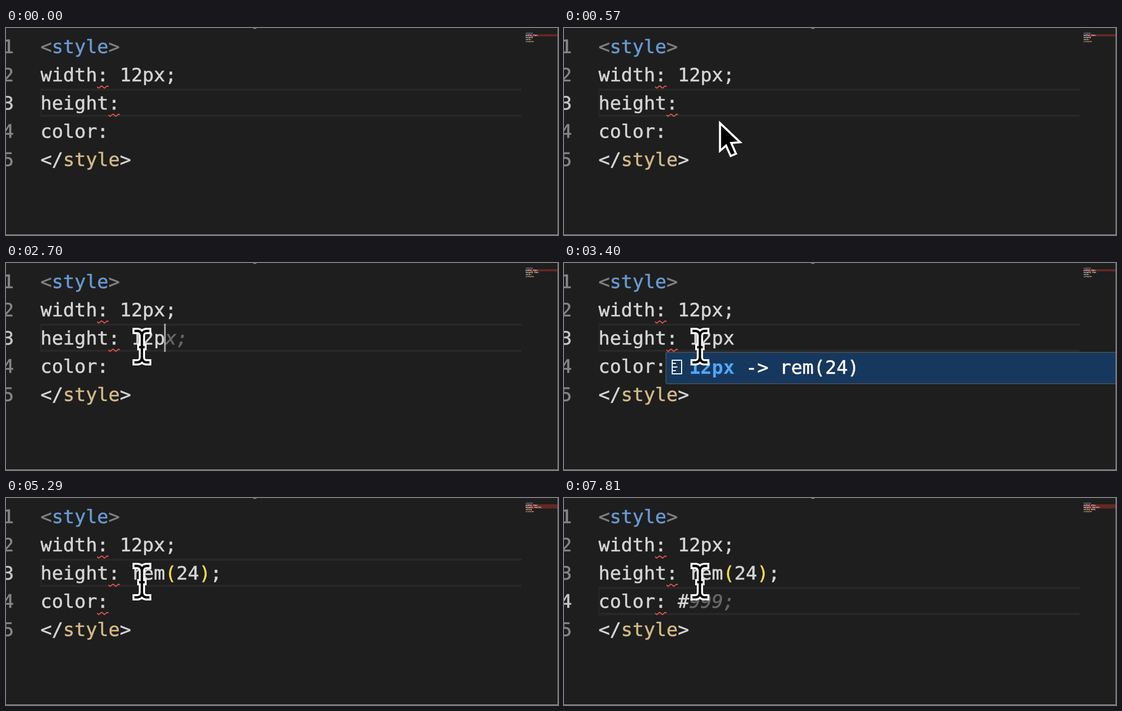
Animation of 1056 by 396 pixels, one loop 8 s. Source, as an HTML page:

```html
<!DOCTYPE html>
<html lang="en">
<head>
<meta charset="utf-8">
<title>Editor</title>
<style>
html, body { margin: 0; width: 100%; height: 100%; overflow: hidden; background: #1e1e1e; }
svg { display: block; }
text {
  font-family: "DejaVu Sans Mono", monospace; font-size: 36px; white-space: pre;
  fill: currentColor; stroke: currentColor; stroke-width: .6; color: #d4d4d4;
}
.tag { color: #808080; }
.blue { color: #679ad1; }
.gold { color: #d2ba85; }
.paren { color: #fad847; }
.num { color: #858585; }
.num.active { color: #c6c6c6; }
.ghost { color: #676767; font-style: italic; }
.match { color: #4fa8fa; font-weight: bold; stroke: none; }
.item { color: #fff; }
.map text { font-size: 3.32px; stroke-width: .2; }
.wave { fill: none; stroke: #e0524a; stroke-width: 2; stroke-linejoin: round; }
.box { fill: rgba(0,100,0,.05); stroke: #868686; stroke-width: 2; }
.arrow { fill: #000; stroke: #fff; stroke-width: 4; }
.beam { fill: none; stroke-linecap: square; }
</style>
</head>
<body>
<svg width="1056" height="396" viewBox="0 0 1056 396">
  <defs>
    <path id="stem" d="M248 130H252Q260 131 260 140V180Q260 189 252 190H248M272 130H268Q260 131 260 140M260 180Q260 189 268 190H272M257 161H263"/>
  </defs>
  <rect width="1056" height="396" fill="#1e1e1e"/>
  <g id="view"></g>
  <g id="arrow"><path class="arrow" d="M1.5 4V57L13 47L22 67L32 62.5L23 42L40 40.5Z"/></g>
  <g id="beam" class="beam">
    <use href="#stem" stroke="#fff" stroke-width="12"/>
    <use href="#stem" stroke="#000" stroke-width="4.6"/>
  </g>
  <path d="M473 0H480L478 1.5H473Z" fill="#8a8a8a"/>
  <path d="M0 395.5H1056" stroke="#a8a8a8"/>
  <path d="M1055.5 0V396" stroke="#808080"/>
</svg>
<script>
const LOOP = 8000, LEFT = 66, TOP = 8, CELL = 21.674, LINE = 54;
const $ = id => document.getElementById(id);
const colX = col => LEFT + col * CELL;
const rowY = row => TOP + (row - 1) * LINE;
// The screen is shown at double size, so hard edges sit on even pixels.
const snapX = col => Math.round(colX(col) / 2) * 2;

// Each step changes part of the editor state; caret 0 means hidden.
const START = { row: 3, height: '', color: '', ghost: '', caret: 0, match: 0, boxes: false, error: false };
const STEPS = [
  [900, { caret: 8 }],
  [1330, { caret: 0 }],
  [1720, { height: ' 1', caret: 9 }],
  [1800, { height: ' 12', caret: 10 }],
  [1980, { ghost: 'px;' }],
  [2280, { caret: 0 }],
  [2700, { height: ' 12p', ghost: 'x;', caret: 11 }],
  [2810, { ghost: '', match: 3 }],
  [2960, { height: ' 12px', caret: 12, match: 4 }],
  [3400, { caret: 0 }],
  [3730, { height: ' rem(24)', caret: 15, match: 0 }],
  [3830, { boxes: true }],
  [4250, { caret: 0 }],
  [4770, { caret: 15 }],
  [4840, { height: ' rem(24);', caret: 16 }],
  [4910, { boxes: false }],
  [4980, { error: true }],
  [5290, { caret: 0 }],
  [5410, { row: 4, caret: 7 }],
  [5920, { caret: 0 }],
  [6390, { caret: 7 }],
  [6910, { caret: 0 }],
  [6990, { color: ' #', caret: 8 }],
  [7510, { caret: 0 }],
  [7810, { ghost: '999;' }]
];

// Pointer tip: time, x, y
const PATH = [
  [260, 162, 336], [304, 257, 265], [348, 312, 232], [393, 318, 212],
  [480, 312, 192], [569, 297, 178], [660, 280, 168], [790, 260, 160]
];
const SHOW = 260, BEAM = 835, TICK = 44.2;

const esc = s => s.replace(/&/g, '&amp;').replace(/</g, '&lt;').replace(/>/g, '&gt;');
const label = (x, y, s, cls = '') => `<text x="${x}" y="${y}" class="${cls}">${esc(s)}</text>`;
const rect = (x, y, w, h, fill) => `<rect x="${x}" y="${y}" width="${w}" height="${h}" fill="${fill}"/>`;
const code = (col, row, s, cls) => label(colX(col), rowY(row) + 39.5, s, cls);

// Draws a run of [text, class] pieces on one line.
function line(row, parts) {
  let col = 0;
  return parts.map(([s, cls]) => {
    const out = code(col, row, s, cls);
    col += s.length;
    return out;
  }).join('');
}

function wave(col, row) {
  const period = 'l2.6 2.5h1l4.4 -3.9h1l1.84 1.4';
  return `<path class="wave" d="M${colX(col)} ${rowY(row) + LINE - 3.7}${period}${period}"/>`;
}

function bracketBox(col) {
  const x = snapX(col), w = snapX(col + 1) - x;
  return `<rect class="box" x="${x + 1}" y="${rowY(3) + 1}" width="${w - 2}" height="${LINE - 2}"/>`;
}

function currentLine(row) {
  const y = rowY(row), c = '#282828';
  return rect(LEFT, y, 920, 4, c) + rect(LEFT, y + LINE - 4, 920, 4, c) + rect(LEFT, y, 2, LINE, c);
}

function popup(match) {
  const x = colX(8), word = '12px', rest = ' -> rem(24)';
  return '<rect x="195" y="171" width="900" height="60" rx="3" fill="#17385e" stroke="#454a50" stroke-width="2"/>' +
    '<path d="M207 186H225V212H207ZM208 192H214M208 199H217M208 206H214" fill="none" stroke="#fff" stroke-width="2"/>' +
    label(x, 212, word.slice(0, match), 'match') +
    label(x + match * CELL, 212, word.slice(match) + rest, 'item');
}

function minimap(lines, errors, bars) {
  const x = 994;
  return '<g class="map">' + rect(x, 12, 61, bars * 4, '#642823') +
    errors.map(([col, row]) => rect(x + col * 2, 4 + row * 4, 2, 4, '#d8443c')).join('') +
    lines.map((s, i) => label(x, 11.2 + i * 4, s, ['blue', '', '', '', 'gold'][i])).join('') + '</g>';
}

function draw(s) {
  const height = 'height:' + s.height, color = 'color:' + s.color;
  const parts = height.split(/([()])/).map(p => [p, /[()]/.test(p) ? 'paren' : '']);
  const errors = [[5, 2], [6, 3]];
  if (s.error) errors.push([5, 4]);
  const tail = row => s.row === row ? s.ghost : '';
  const lines = ['<style>', 'width: 12px;', height + tail(3), color + tail(4), '</style>'];

  let out = currentLine(s.row);
  for (let n = 1; n <= 5; n++) {
    out += label(-6.5, rowY(n) + 39.5, String(n), n === s.row ? 'num active' : 'num');
  }
  if (s.boxes) out += bracketBox(11) + bracketBox(14);
  out += line(1, [['<', 'tag'], ['style', 'blue'], ['>', 'tag']]);
  out += line(2, [['width: 12px;', '']]);
  out += line(3, [...parts, [tail(3), 'ghost']]);
  out += line(4, [[color, ''], [tail(4), 'ghost']]);
  out += line(5, [['</', ''], ['style', 'gold'], ['>', '']]);
  out += errors.map(e => wave(...e)).join('');
  out += minimap(lines, errors, s.error ? 2 : 1);
  if (s.caret) out += rect(snapX(s.caret) - 1.5, rowY(s.row), 3, LINE, '#aeafad');
  if (s.match) out += popup(s.match);
  $('view').innerHTML = out;
}

function tipAt(t) {
  const i = PATH.findIndex(p => p[0] > t);
  if (i < 0) return PATH[PATH.length - 1].slice(1);
  if (i === 0) return PATH[0].slice(1);
  const [t0, x0, y0] = PATH[i - 1], [t1, x1, y1] = PATH[i];
  const k = (t - t0) / (t1 - t0);
  return [x0 + (x1 - x0) * k, y0 + (y1 - y0) * k];
}

function movePointer(t) {
  const beam = t >= BEAM, arrow = t >= SHOW && !beam;
  $('beam').setAttribute('visibility', beam ? 'visible' : 'hidden');
  $('arrow').setAttribute('visibility', arrow ? 'visible' : 'hidden');
  if (!arrow) return;
  const held = SHOW + Math.floor((t - SHOW) / TICK) * TICK;
  $('arrow').setAttribute('transform', `translate(${tipAt(held)})`);
}

let shown = -1;
function frame(now) {
  const t = (now - begin + LOOP) % LOOP;
  const count = STEPS.filter(([at]) => at <= t).length;
  if (count !== shown) {
    draw(Object.assign({}, START, ...STEPS.slice(0, count).map(step => step[1])));
    shown = count;
  }
  movePointer(t);
  requestAnimationFrame(frame);
}

const begin = performance.now();
frame(begin);
</script>
</body>
</html>
```
